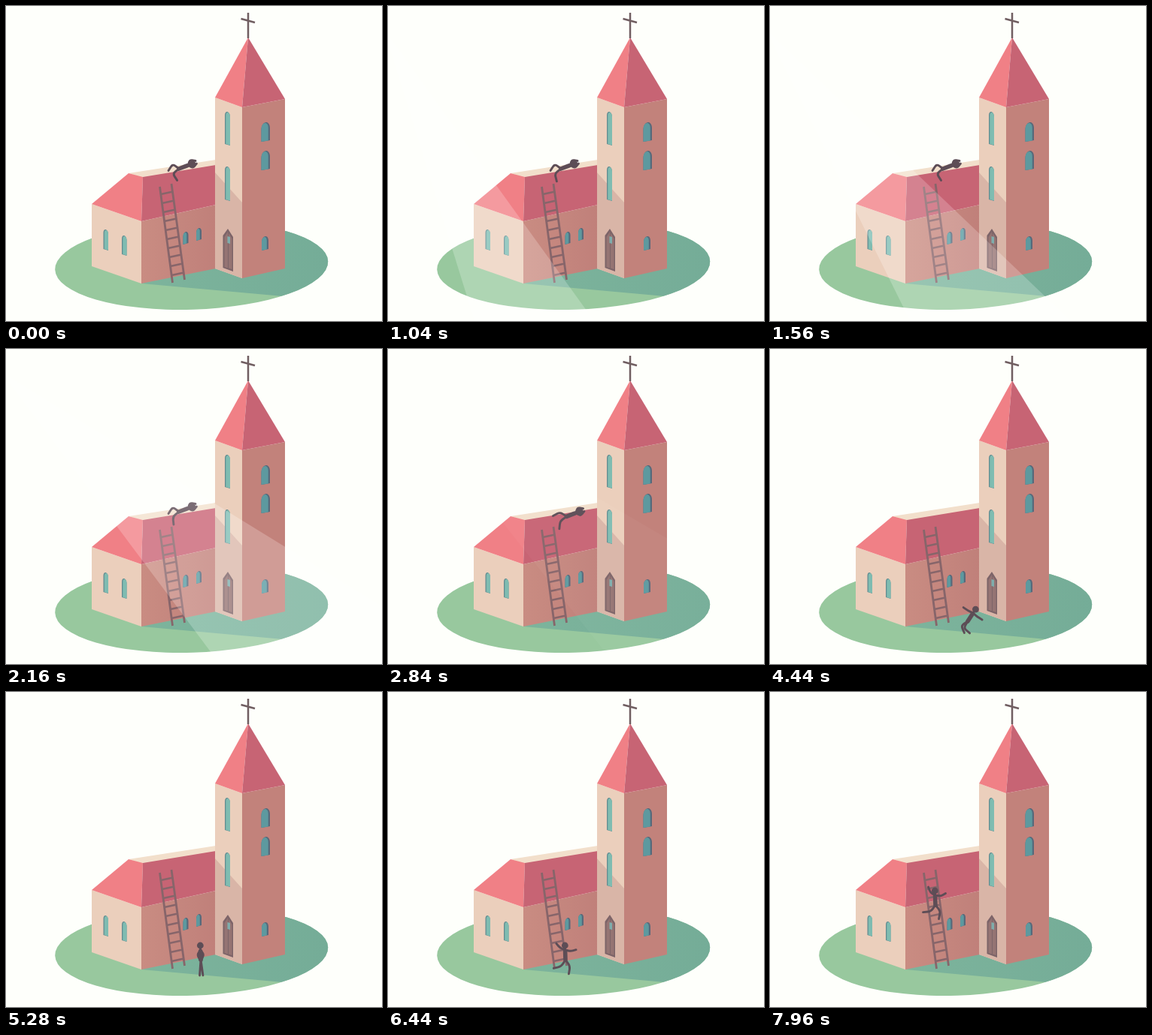
Recreate the animation shown at these times as an HTML page. Size 500 by 420 pixels, loop 8000 ms.

```html
<!DOCTYPE html>
<html lang="en">
<head>
<meta charset="utf-8">
<title>Chapel roof</title>
<style>
  html, body { margin: 0; width: 100%; height: 100%; overflow: hidden; background: #fefffb; }
  svg { display: block; width: 500px; height: 420px; background: #fefffb; isolation: isolate; }
  #beam { fill: #fff; mix-blend-mode: soft-light; }
</style>
</head>
<body>
<svg viewBox="0 0 500 420">
  <defs>
    <linearGradient id="shade"><stop stop-color="#7db49c"/><stop offset="1" stop-color="#72aa96"/></linearGradient>
    <linearGradient id="wall"><stop stop-color="#c98c82"/><stop offset="1" stop-color="#c0807a"/></linearGradient>
    <clipPath id="island"><ellipse cx="246.700" cy="346" rx="181.600" ry="58.700" transform="rotate(-1.76 247 346)"/></clipPath>
  </defs>

  <g clip-path="url(#island)">
    <rect width="500" height="420" fill="#98c89e"/>
    <path d="M180 370L500 399V270H180Z" fill="url(#shade)"/>
  </g>

  <!-- nave -->
  <path d="M114 264L180 287V370L114 347Z" fill="#ebcfbc"/>
  <path d="M180 287L279 265V350L180 370Z" fill="url(#wall)"/>
  <path d="M163 223L279 205V214L182 229Z" fill="#f2dfcb"/>
  <path d="M114 264L163 223L182 228L180 287Z" fill="#f08086"/>
  <path d="M182 228L279 212V265L180 287Z" fill="#c76474"/>

  <!-- tower -->
  <path d="M278 122L314 135V363L278 350Z" fill="#ebcfbc"/>
  <path d="M278 222L314 262V363L278 350Z" fill="#d9b5a7"/>
  <path d="M314 135L371 124V350L314 363Z" fill="#c2827b"/>
  <path d="M322 42L278 122L314 135Z" fill="#f08086"/>
  <path d="M322 42L314 135L371 124Z" fill="#c76474"/>
  <path d="M322 9V43M312.500 17L331 22" stroke="#705e61" stroke-width="2.500" fill="none"/>

  <g id="windows"></g>
  <path d="M288.500 349V306L295 297L302 308V354Z" fill="#7c6468"/>
  <path d="M290.500 348V308L295 301L300.500 310V351Z" fill="#957473"/>
  <path d="M295.500 302V350" stroke="#7c6468"/>
  <path d="M294.500 307L298 308V317L294.500 316Z" fill="#7fadac"/>

  <path id="ladder" stroke="#87656a" stroke-width="2.800" fill="none"/>

  <g fill="none" stroke="#5d4d56" stroke-linecap="round">
    <path id="limbs" stroke-width="2.900"/>
    <path id="torso" stroke-width="5.600"/>
    <circle id="head" r="4.400" fill="#5d4d56" stroke="none"/>
  </g>
  <path id="beam"/>
</svg>
<script>
const LOOP = 8000;
const $ = id => document.getElementById(id);
const set = (id, attrs) => { for (const k in attrs) $(id).setAttribute(k, attrs[k]); };
const lerp = (a, b, k) => a + (b - a) * k;
const ramp = (t, from, to) => Math.min(1, Math.max(0, (t - from) / (to - from)));
const ease = (t, from, to) => { const k = ramp(t, from, to); return k * k * (3 - 2 * k); };

// Arched window; s is the perspective slant across its width
function arch(x, y, w, h, s, fill) {
  const top = y + w * .8, lift = y - w * .27;
  return `<path fill="${fill}" d="M${x} ${y + h}V${top}C${x} ${lift} ${x + w} ${lift + s}
    ${x + w} ${top + s}V${y + h + s}Z"/>`;
}
const lit = (x, y, w, h) =>
  arch(x, y, w, h, 2, '#638d91') + arch(x + 1.3, y + 1.3, w - 1.3, h - 1.3, 1.6, '#7fbcb1');
const dim = (x, y, w, h) =>
  arch(x, y, w, h, -2, '#57697a') + arch(x, y + .8, w - 2.2, h - .8, -1.5, '#5d999f');

$('windows').innerHTML =
  lit(291, 140, 7, 44) + lit(291, 213, 7, 45) +
  lit(129.5, 297, 6.5, 27) + lit(154, 305, 6.5, 26) +
  dim(235.5, 302, 7, 16) + dim(253, 297, 7, 16) +
  dim(339.5, 156, 11.5, 25) + dim(339.5, 194, 11.5, 25) + dim(340, 308, 9, 18);

let ladder = 'M204.500 241L221.500 369M220 237L237.500 365';
for (let i = 0; i < 10; i++) ladder += `M${205.8 + i * 1.6} ${251 + i * 12}l16 -3.5`;
set('ladder', { d: ladder });

// Point at a distance along an angle in degrees
const go = ([x, y], deg, len) =>
  [x + len * Math.cos(deg * Math.PI / 180), y + len * Math.sin(deg * Math.PI / 180)];

// Rounded two-part limb; bend is the turn at the joint
function limb(from, deg, bend, size) {
  const joint = go(from, deg, size), end = go(joint, deg + bend, size);
  const a = go(from, deg, size * .6), b = go(joint, deg + bend, size * .4);
  return `M${from}L${a}Q${joint} ${b}L${end}`;
}

function drawMan(t) {
  const fall = ramp(t, 2680, 3470);
  const rise = (ease(t, 3800, 4200) + ease(t, 4400, 5200)) / 2;
  const walk = ramp(t, 5320, 6440);
  const climb = ramp(t, 6440, 7960);
  const grip = ease(t, 6200, 6500);

  const hip = [
    230 + 37 * fall - 8 * rise - 23 * walk - 16 * climb,
    217 + 152 * fall ** 2 - 12 * rise - 73 * climb ** 1.15
  ];
  const lean = lerp(-21, -92, rise), down = lean + 180;
  const neck = go(hip, lean, 13), head = go(neck, lean, 6);

  const raised = 1 - rise + .7 * grip;
  const pull = 22 * grip * Math.cos(climb * Math.PI * 6);
  const knee = -95 + 165 * fall - 150 * ease(t, 3800, 4200) + 80 * ease(t, 4400, 5200) + 50 * grip;
  const stride = 38 - 18 * fall - 14 * rise + 18 * Math.sin(walk * Math.PI * 6) + 1.4 * pull;
  const dangle = 14 * Math.cos(t * Math.PI / 750) * (1 - fall);

  let limbs = `M${neck}L${head}`;
  for (const side of [1, -1]) {
    const arm = down + side * lerp(35, 130, raised) + pull;
    const thigh = down + 20 * (1 - rise) + side * stride;
    limbs += limb(neck, arm, side * lerp(-60, 80, raised), 7.5);
    limbs += limb(hip, thigh, knee + (side < 0 ? 25 - dangle : 0) * (1 - fall), 10.5);
  }
  set('limbs', { d: limbs });
  set('torso', { d: `M${hip}L${go(neck, lean, -1.5)}` });
  set('head', { cx: head[0], cy: head[1] });
}

// A wedge of light turning about a far-off lamp
function drawBeam(t) {
  const lamp = [-5, 32];
  const trailing = Math.max(51.7, 90.9 - .0174 * t);
  const leading = Math.max(30.4, 75.3 - .0202 * t);
  set('beam', {
    d: `M${lamp}L${go(lamp, trailing, 800)}L${go(lamp, leading, 800)}Z`,
    opacity: .5 * ramp(t, 40, 500) * (1 - ramp(t, 2500, 2900))
  });
}

const start = performance.now();
function frame() {
  const t = (performance.now() - start) % LOOP;
  drawMan(t);
  drawBeam(t);
  requestAnimationFrame(frame);
}
frame();
</script>
</body>
</html>
```
